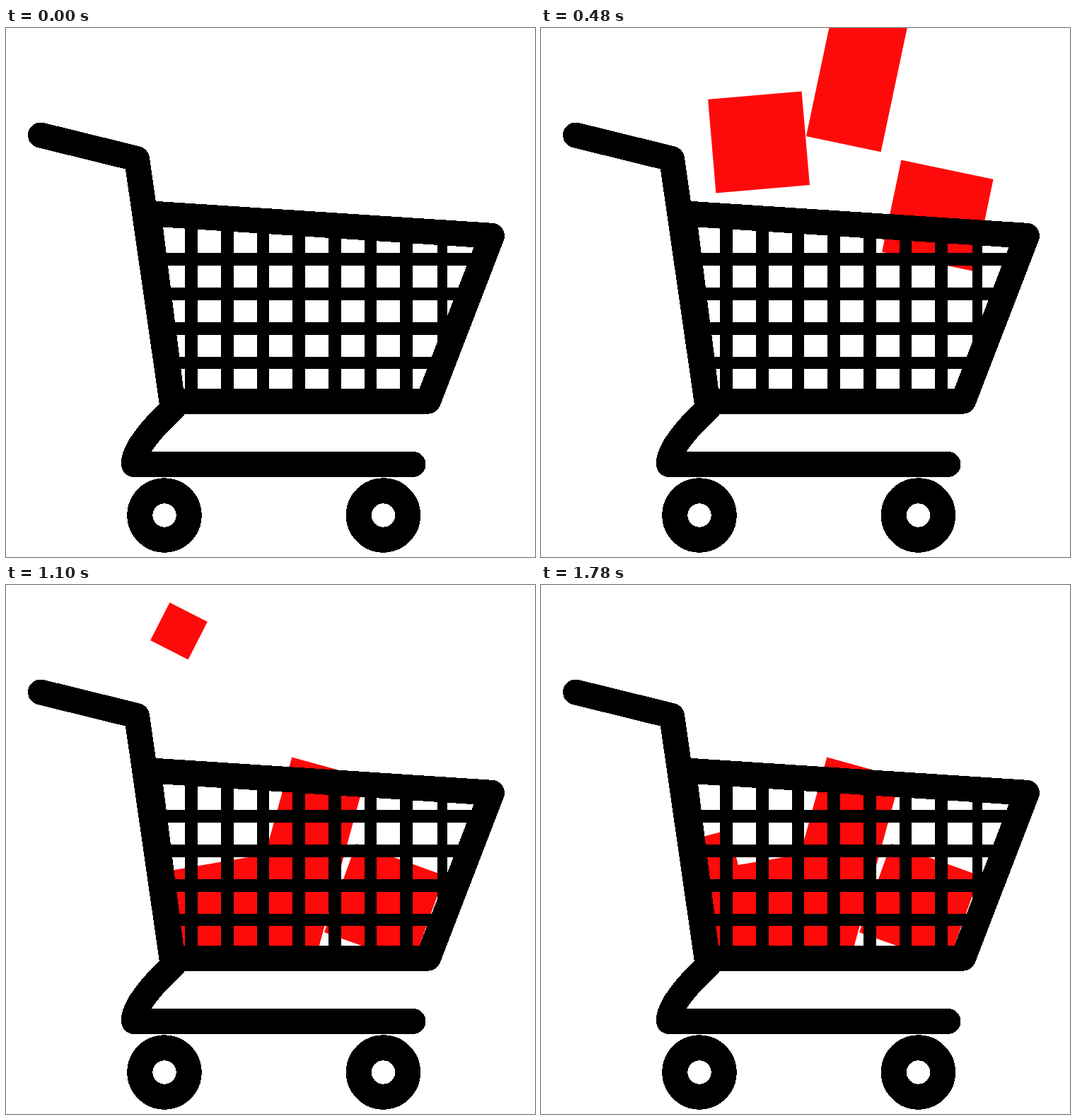
An HTML page that plays this animation: 748x748 px, repeating every 3.6 s.

```html
<!DOCTYPE html>
<html lang="en">
<head>
<meta charset="utf-8">
<title>Filling a shopping cart</title>
<style>
  html, body { margin: 0; width: 100%; height: 100%; overflow: hidden; background: #fff; }
  svg { display: block; width: 100vw; height: 100vh; }
  .goods { fill: #ff0a0a; }
  .goods rect { transform-origin: 0 0; }
  .frame { fill: none; stroke: #000; stroke-width: 36; stroke-linecap: round; stroke-linejoin: round; }
</style>
</head>
<body>
<svg viewBox="0 0 748 748" shape-rendering="crispEdges">
  <defs>
    <clipPath id="inside"><path d="M201 263 L687 293.5 L597 527 H235 Z"/></clipPath>
  </defs>
  <g class="goods" id="goods"></g>
  <g id="grid" clip-path="url(#inside)"></g>
  <g class="frame">
    <path d="M49 151.5 L185 185 L234.3 527"/>
    <path d="M201.5 262.2 L687 293.8 L597 527.6 H235 Z"/>
    <path d="M236.5 538 Q185.5 585 181 612 V617 H575.5"/>
    <circle cx="224" cy="689" r="34.7"/>
    <circle cx="533.5" cy="689" r="34.7"/>
  </g>
</svg>
<script>
const LOOP = 3600, STEP = 20, FIRST_MOVE = 120, LAST_MOVE = 1780;

// start and duration in ms; poses are [centre x, centre y, degrees]
const boxes = [
  { w: 133, h: 133, start: -8, duration: 1045, from: [312.3, -81, -1], to: [301.5, 459, -9.7] },
  { w: 133, h: 133, start: 114, duration: 613, from: [608.1, -80, -3], to: [534.8, 450.3, 19.8] },
  { w: 108, h: 272, start: 286, duration: 483, from: [475, -160, 10.1], to: [420.2, 389, 15.4] },
  { w: 59.5, h: 59.5, start: 676, duration: 1121, from: [244.5, -80, 5], to: [244.5, 383, 75.5] },
];

function addRect(parent, x, y, width, height) {
  const rect = document.createElementNS('http://www.w3.org/2000/svg', 'rect');
  for (const [name, value] of Object.entries({ x, y, width, height })) rect.setAttribute(name, value);
  return parent.appendChild(rect);
}

const grid = document.getElementById('grid');
for (let i = 0; i < 7; i++) addRect(grid, 253.4 + 50.65 * i, 250, 17.6, 290);
addRect(grid, 610, 250, 14, 290);
for (let i = 0; i < 4; i++) addRect(grid, 190, 318 + 49 * i, 500, i < 3 ? 17.8 : 16.5);

const easeInOut = s => (1 - Math.cos(Math.PI * Math.min(1, Math.max(0, s)))) / 2;

function poseAt({ start, duration, from, to }, time) {
  const k = easeInOut((time - start) / duration);
  const [x, y, angle] = from.map((a, i) => a + (to[i] - a) * k);
  return `translate(${x.toFixed(2)}px, ${y.toFixed(2)}px) rotate(${angle.toFixed(2)}deg)`;
}

// one held pose per step; each begins a hair early so that exact step times land on it
function heldPoses(box) {
  const poses = [{ offset: 0, transform: poseAt(box, 0), easing: 'steps(1, end)' }];
  for (let t = FIRST_MOVE; t <= LAST_MOVE; t += STEP) {
    poses.push({ offset: (t - 0.5) / LOOP, transform: poseAt(box, t), easing: 'steps(1, end)' });
  }
  poses.push({ offset: 1, transform: poseAt(box, LAST_MOVE) });
  return poses;
}

const goods = document.getElementById('goods');
for (const box of boxes) {
  const rect = addRect(goods, -box.w / 2, -box.h / 2, box.w, box.h);
  rect.animate(heldPoses(box), { duration: LOOP, iterations: Infinity });
}
</script>
</body>
</html>
```
